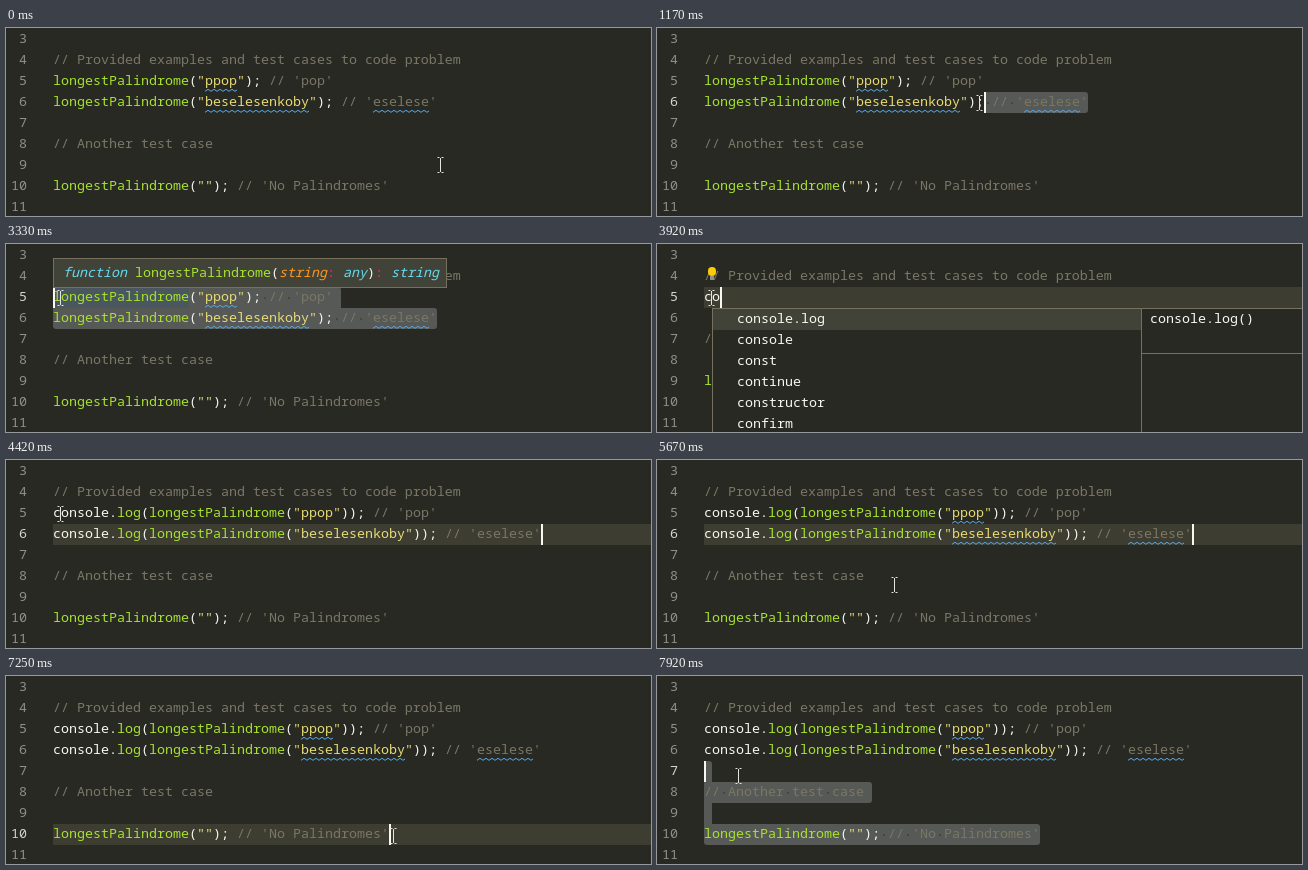
These frames come from a looping animation (645 px wide and 188 px high, 8000 ms). An HTML page with a canvas:

```html
<!DOCTYPE html>
<html lang="en">
<head>
<meta charset="utf-8">
<title>Code editor</title>
<style>
html, body { margin: 0; width: 645px; height: 188px; overflow: hidden; background: #282923; }
canvas { display: block; }
</style>
</head>
<body>
<canvas id="stage" width="645" height="188"></canvas>
<script>
const ctx = document.getElementById('stage').getContext('2d');
const LOOP = 8000, FPS = 12, LEFT = 47, CHAR = 8, ROW = 21, FIRST = 3;
const FONT = '13.3333px "Noto Sans Mono", "DejaVu Sans Mono", monospace';
const C = {
  bg: '#282923', line: '#3e3d32', select: '#575956', text: '#f8f8f2', comment: '#7a7766',
  string: '#e6db74', green: '#a6e22e', cyan: '#66d9ef', orange: '#fd971f', red: '#f92672',
  number: '#90908a', active: '#d4d4d0', space: '#464741', squiggle: '#5aa9e6',
  panel: '#414339', border: '#75715e', bulb: '#ffcc00', hover: 'rgba(38,79,120,.25)'
};

const head = ['', '// Provided examples and test cases to code problem'];
const tail = ['', '// Another test case', '', 'longestPalindrome(""); // \'No Palindromes\'', ''];
const calls = ['longestPalindrome("ppop"); // \'pop\'',
               'longestPalindrome("beselesenkoby"); // \'eselese\''];
const logged = calls.map(s => 'console.log(' + s.replace(';', ');'));
const choices = ['console.log', 'console', 'const', 'continue', 'constructor', 'confirm'];

// Moments, in steps of 1/12 s
const DRAG = 10, DROP = 29, BULB = 35, HOVER = 40, TYPE = 45, LIST = 47, BULB_OFF = 51,
      INSERT = 53, CHECKED = 54, DRAG2 = 87;

// Pointer path: step, x, y
const path = [
  [0, 435, 137], [8, 443, 79], [10, 443, 79], [14, 323, 75], [18, 140, 62], [21, 87, 54],
  [29, 50, 50], [30, 50, 51], [32, 50, 60], [34, 52, 58], [36, 55, 54], [64, 55, 54],
  [70, 330, 160], [72, 395, 173], [74, 417, 168], [83, 417, 168], [86, 388, 160],
  [87, 388, 160], [92, 160, 118], [93, 125, 112], [95, 82, 100]
];

function pointer(k) {
  const i = path.findIndex(p => p[0] >= k);
  if (i < 1) return path[0].slice(1);
  const [a, x, y] = path[i - 1], [b, u, v] = path[i], f = (k - a) / (b - a);
  return [Math.round(x + (u - x) * f), Math.round(y + (v - y) * f)];
}

const rowY = line => 1 + (line - FIRST) * ROW;
const colX = col => LEFT + col * CHAR;

function box(x, y, w, h, fill, radius = 0) {
  ctx.fillStyle = fill;
  ctx.beginPath();
  ctx.roundRect(x, y, w, h, radius);
  ctx.fill();
}

function panel(x, y, w, h, fill) {
  box(x, y, w, h, C.border);
  box(x + 1, y + 1, w - 2, h - 2, fill);
}

function write(text, x, y, color, style = '') {
  ctx.font = style + ' ' + FONT;
  ctx.fillStyle = color;
  ctx.fillText(text, x, y);
}

function writeCode(text, line) {
  const token = /(\/\/.*)|("[^"]*")|(longestPalindrome|log(?=\())|[^"\/l]+|./g;
  for (const m of text.matchAll(token)) {
    const color = m[1] ? C.comment : m[2] ? C.string : m[3] ? C.green : C.text;
    write(m[0], colX(m.index), rowY(line) + 14, color);
  }
}

function squiggles(text, line) {
  ctx.strokeStyle = C.squiggle;
  ctx.lineWidth = 1;
  for (const m of text.matchAll(/\b(ppop|beselesenkoby|eselese)\b/g)) {
    const x = colX(m.index), w = m[0].length * CHAR, y = rowY(line) + 20.3;
    ctx.save();
    ctx.beginPath();
    ctx.rect(x, y - 4, w, 6);
    ctx.clip();
    ctx.beginPath();
    for (let i = 0; i <= w + 3; i += 3) ctx.lineTo(x + i, y - (i % 2) * 2);
    ctx.stroke();
    ctx.restore();
  }
}

function place(k, lines) {
  const [x, y] = pointer(k);
  const line = Math.floor((y - 1) / ROW) + FIRST;
  const col = Math.round((x - LEFT) / CHAR);
  return [line, Math.max(0, Math.min(lines[line - FIRST].length, col))];
}

// Caret, selection anchor and the step from which the caret blinks
function cursor(k, lines, typed) {
  if (k < DRAG) return {};
  if (k < TYPE) return {
    at: place(Math.min(k, DROP), lines), from: [6, calls[1].length], blink: k < DROP ? k : DROP - 1
  };
  if (k < INSERT) return { at: [5, typed.length], blink: k };
  if (k < DRAG2) return { at: [6, logged[1].length], blink: INSERT };
  return { at: place(k, lines), from: [10, tail[3].length], blink: k };
}

function drawSelection([l0, c0], [l1, c1], lines) {
  const start = l => l === l0 ? c0 : 0;
  const end = l => l < l0 || l > l1 ? 0 : l === l1 ? c1 : lines[l - FIRST].length + 1;
  for (let l = l0; l <= l1; l++) {
    const a = start(l), b = end(l), text = lines[l - FIRST];
    // Round only the corners on the outline of the whole selection
    const corners = [
      l === l0, b > end(l - 1), b > end(l + 1), l === l1 || a > start(l + 1)
    ].map(outer => outer ? 3 : 0);
    box(colX(a), rowY(l), (b - a) * CHAR, ROW, C.select, corners);
    for (let c = a; c < Math.min(b, text.length); c++)
      if (text[c] === ' ') box(colX(c) + 3, rowY(l) + 10, 2, 2, C.space);
  }
}

function drawHover() {
  panel(LEFT, 14, 394, 30, C.panel);
  let x = 57;
  const put = (s, color, style) => { write(s, x, 33, color, style); x += s.length * CHAR; };
  put('function ', C.cyan, 'italic');
  put('longestPalindrome', C.green);
  put('(', C.text);
  put('string', C.orange, 'italic');
  put(':', C.red);
  put(' any', C.cyan, 'italic');
  put(')', C.text);
  put(':', C.red);
  put(' string', C.cyan, 'italic');
}

function drawChoices() {
  panel(55, 64, 430, 140, C.bg);
  panel(484, 64, 200, 46, C.bg);
  box(56, 65, 428, ROW, C.panel);
  choices.forEach((s, i) => write(s, 80, 79 + i * ROW, C.text));
  write('console.log()', 493, 79, C.text);
}

function drawBulb() {
  box(51, 23, 8, 9, C.bulb, 4);
  box(53, 32, 4, 4, C.number);
}

function drawPointer(k) {
  const [x, y] = pointer(k);
  ctx.save();
  ctx.translate(x - .5, y);
  ctx.lineWidth = 1;
  ctx.strokeStyle = '#e4e4e0';
  ctx.beginPath();
  for (const end of [-7.5, 7.5]) {
    ctx.moveTo(-3, end); ctx.lineTo(-1, end);
    ctx.moveTo(1, end); ctx.lineTo(3, end);
  }
  ctx.moveTo(0, -7); ctx.lineTo(0, 7);
  ctx.stroke();
  ctx.restore();
}

function draw(k) {
  const typed = 'con'.slice(0, k < LIST ? 1 : k - LIST + 2);
  const body = k < TYPE ? calls : k < INSERT ? [typed] : logged;
  const lines = [...head, ...body, ...tail, ''].slice(0, 9);
  const { at, from, blink } = cursor(k, lines, typed);
  const hover = k >= HOVER && k < TYPE;

  box(0, 0, 645, 188, C.bg);
  if (at) {
    const selected = from && (at[0] !== from[0] || at[1] !== from[1]);
    if (selected) drawSelection(at, from, lines);
    else box(LEFT, rowY(at[0]), 645 - LEFT, ROW, C.line);
  }
  if (hover) box(LEFT, rowY(5), 17 * CHAR, ROW, C.hover);

  lines.forEach((text, i) => {
    const line = i + FIRST, label = String(line);
    write(label, 21 - label.length * CHAR, rowY(line) + 14, at && at[0] === line ? C.active : C.number);
    writeCode(text, line);
    if (k < TYPE || k >= CHECKED) squiggles(text, line);
  });

  if (at && (k - blink) % 12 < 6) box(colX(at[1]), rowY(at[0]), 2, ROW, C.text);
  if (k >= BULB && k < BULB_OFF) drawBulb();
  if (hover) drawHover();
  if (k >= LIST && k < INSERT) drawChoices();
  drawPointer(k);
}

function tick() {
  const t = performance.now() % LOOP;
  draw(Math.min(95, Math.floor((t + 5) * FPS / 1000)));
  requestAnimationFrame(tick);
}
tick();
</script>
</body>
</html>
```
